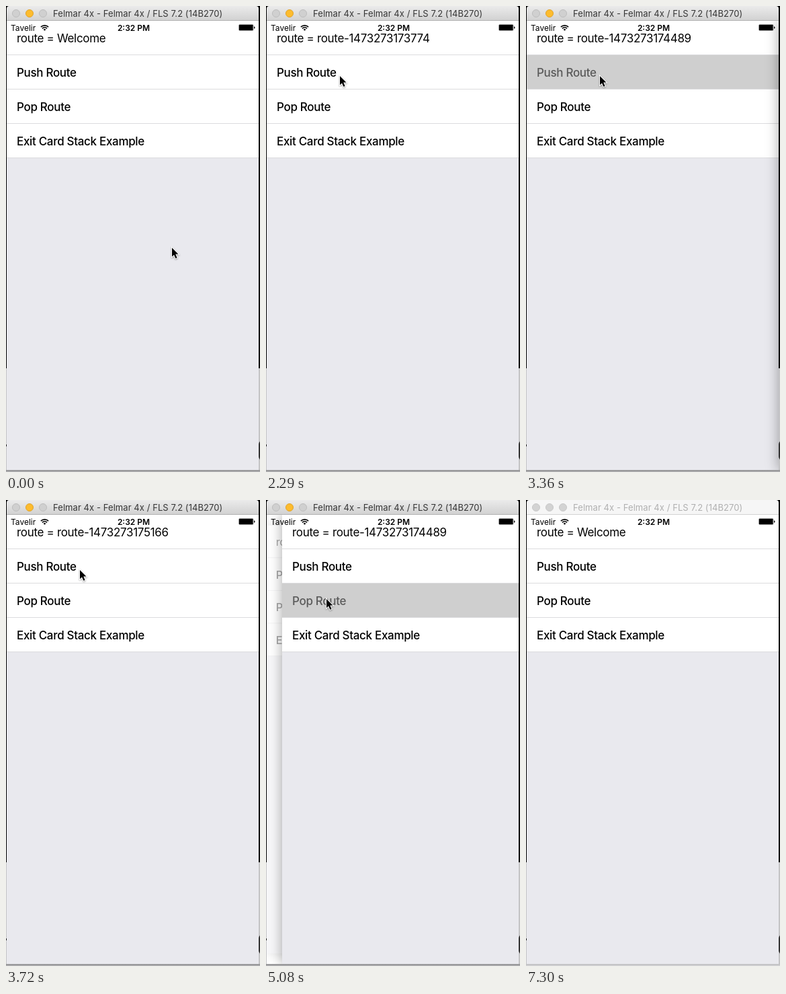
These frames come from a looping animation (378 by 692 pixels, 7.4 s). An HTML page:

```html
<!DOCTYPE html>
<html lang="en">
<head>
<meta charset="utf-8">
<title>Card stack</title>
<style>
html, body { margin: 0; width: 100%; height: 100%; overflow: hidden; }
body { position: relative; background: #c4c4c6; font-family: Inter, "Liberation Sans", sans-serif; color: #000; }
div, svg, span.at { position: absolute; }
.at { white-space: pre; }

#stage { left: 0; top: 0; width: 378px; height: 692px; overflow: hidden; }
#desk { left: 0; top: 0; width: 378px; height: 538px; background: #000; }
#knob { left: 376px; top: 645px; width: 12px; height: 30px; border-radius: 8px; background: #333; }
#dot { left: 0; top: 651px; width: 1px; height: 3px; background: #222; }
#shade { left: 0; top: 689px; width: 378px; height: 3px; background: linear-gradient(#8c8c8e, #b4b4b6); }

#bar { left: 1px; top: 0; width: 375px; height: 22px; box-sizing: border-box; border-radius: 4px 4px 0 0;
  background: linear-gradient(#ebebeb, #d2d2d2); border-bottom: 1px solid #b2b2b2; color: #363636; }
#bar .at { left: 69px; top: 0; font-size: 13px; line-height: 22px; letter-spacing: .07px; }
#bar i { position: absolute; top: 5px; width: 12px; height: 12px; box-sizing: border-box; border-radius: 50%;
  background: #d0d0d0; border: 1px solid #bdbdbd; }
#bar i:nth-child(1) { left: 8px; }
#bar i:nth-child(2) { left: 28px; background: #fdbc2e; border-color: #e0a32a; }
#bar i:nth-child(3) { left: 48px; }
.idle #bar { background: #f6f6f6; border-color: #d3d3d3; color: #b0b0b0; }
.idle #bar i { background: #d3d3d3; border-color: #c8c8c8; }
.idle #shade { background: linear-gradient(#bcbcbe, #d4d4d6); }
.idle #cursor { display: none; }

#screen { left: 1px; top: 22px; width: 375px; height: 667px; overflow: hidden; background: #fff; }
.card { inset: 0; background: #e9e9ee; box-shadow: 0 0 18px rgba(0, 0, 0, .35); }
.row { left: 0; width: 360px; padding-left: 15px; height: 50px; border-bottom: 1px solid #dcdcde;
  background: #fff; font-size: 17px; font-weight: 500; line-height: 52px; letter-spacing: -.32px; white-space: pre; }
.row:nth-child(1) { top: 0; font-weight: 400; }
.row:nth-child(2) { top: 51px; }
.row:nth-child(3) { top: 102px; }
.row:nth-child(4) { top: 153px; }
.row.lit { background: #cfcfcf; color: #5a5a5a; }

.status { top: 25px; font-size: 12px; line-height: 15px; }
#clock { left: 140px; width: 100px; text-align: center; font-weight: 600; }
#cursor { left: -2px; top: -2px; overflow: visible; filter: drop-shadow(0 1px 1px rgba(0, 0, 0, .35)); }
</style>
</head>
<body>
<div id="stage">
  <div id="desk"></div>
  <div id="knob"></div>
  <div id="dot"></div>
  <div id="shade"></div>
  <div id="bar"><i></i><i></i><i></i><span class="at">Felmar 4x - Felmar 4x / FLS 7.2 (14B270)</span></div>
  <div id="screen"></div>
  <span class="at status" style="left:7px">Tavelir</span>
  <svg style="left:51px;top:27px" width="13" height="10" viewBox="0 0 13 10">
    <path d="M.9 4.1a8 8 0 0 1 11.2 0M3 6.3a5 5 0 0 1 7 0" fill="none" stroke="#000" stroke-width="1.7"/>
    <path d="M6.5 9.8L4.6 7.9a2.7 2.7 0 0 1 3.8 0z"/>
  </svg>
  <div class="status" id="clock">2:32 PM</div>
  <svg style="left:346px;top:27px" width="25" height="10" viewBox="0 0 25 10">
    <rect x=".5" y=".5" width="21.5" height="9" rx="1.5" fill="none" stroke="#000" stroke-opacity=".4"/>
    <rect x="1" y="1" width="20.5" height="8" rx=".5"/>
    <path d="M23 3.2q1.6 .4 1.6 1.8t-1.6 1.8z"/>
  </svg>
  <svg id="cursor" width="16" height="22" viewBox="-2 -2 16 22">
    <path d="M0 0V13.2L3 10.4L5.4 15.8L7.6 14.9L5.3 9.6H9.5Z" stroke="#fff" stroke-width="2" paint-order="stroke"/>
  </svg>
</div>
<script>
const LOOP = 7400, TICK = 60, SLIDE = 250, LEAD = 276, WIDTH = 375;
const routes = ["Welcome", "route-1473273173774", "route-1473273174489", "route-1473273175166"];

// first change, last change, stack depth before and after
const slides = [
  [2020, 2290, 0, 1], [2730, 3050, 1, 2], [3360, 3720, 2, 3],
  [4250, 4560, 3, 2], [4870, 5290, 2, 1], [5690, 5960, 1, 0]
];
// first change, last change, pointer position at the end
const home = [247, 359];
const hops = [
  [1210, 1390, 117, 76], [1610, 1760, 110, 104], [3830, 4010, 90, 150],
  [4870, 4870, 90, 147], [6380, 6550, 245, 427], [6780, 6890, 312, 623]
];

const stage = document.getElementById("stage");
const cursor = document.getElementById("cursor");
const back = makeCard(), front = makeCard();

function makeCard() {
  const card = document.createElement("div");
  card.className = "card";
  for (const label of ["", "Push Route", "Pop Route", "Exit Card Stack Example"]) {
    const row = document.createElement("div");
    row.className = "row";
    row.textContent = label;
    card.append(row);
  }
  document.getElementById("screen").append(card);
  return card;
}

const clamp = x => Math.min(1, Math.max(0, x));
const ease = x => x < .5 ? (2 * x) ** 1.7 / 2 : 1 - (2 - 2 * x) ** 1.7 / 2;

const snap = (t, t0, t1) => Math.max(t0, t1 - Math.ceil(Math.max(0, t1 - t) / TICK) * TICK);

function setCard(card, depth, litRow) {
  const text = "route = " + routes[depth];
  if (card.children[0].textContent !== text) card.children[0].textContent = text;
  [...card.children].forEach((row, i) => row.classList.toggle("lit", i === litRow));
}

function drawCards(t) {
  const slide = slides.filter(s => t >= s[0]).pop();
  const moving = slide && t < slide[1];
  front.style.display = moving ? "" : "none";
  if (!moving) {
    setCard(back, slide ? slide[3] : 0);
    back.style.opacity = 1;
    back.style.transform = "none";
    return;
  }
  const [t0, t1, from, to] = slide;
  const now = snap(t, t0, t1), age = now - (t1 - LEAD);
  const push = to > from, done = ease(clamp(age / SLIDE));
  const p = push ? done : 1 - done;
  const lit = age < 100;
  setCard(back, Math.min(from, to), lit && push ? 1 : -1);
  setCard(front, Math.max(from, to), lit && !push ? 2 : -1);
  back.style.opacity = 1 - .7 * p;
  back.style.transform = `translateX(${-10 * p}px) scale(${1 - .05 * p})`;
  front.style.transform = `translateX(${Math.round(WIDTH * (1 - p))}px)`;
}

function drawCursor(t) {
  let [x, y] = home;
  for (const [t0, t1, x1, y1] of hops) {
    if (t < t0) break;
    const k = ease(clamp((snap(t, t0, t1) - t0 + TICK) / (t1 - t0 + TICK)));
    x += (x1 - x) * k;
    y += (y1 - y) * k;
  }
  cursor.style.transform = `translate(${Math.round(x)}px, ${Math.round(y)}px)`;
}

const begin = performance.now();
function frame() {
  const t = (performance.now() - begin) % LOOP;
  drawCards(t);
  drawCursor(t);
  stage.classList.toggle("idle", t >= 7300);
  requestAnimationFrame(frame);
}
frame();
</script>
</body>
</html>
```
